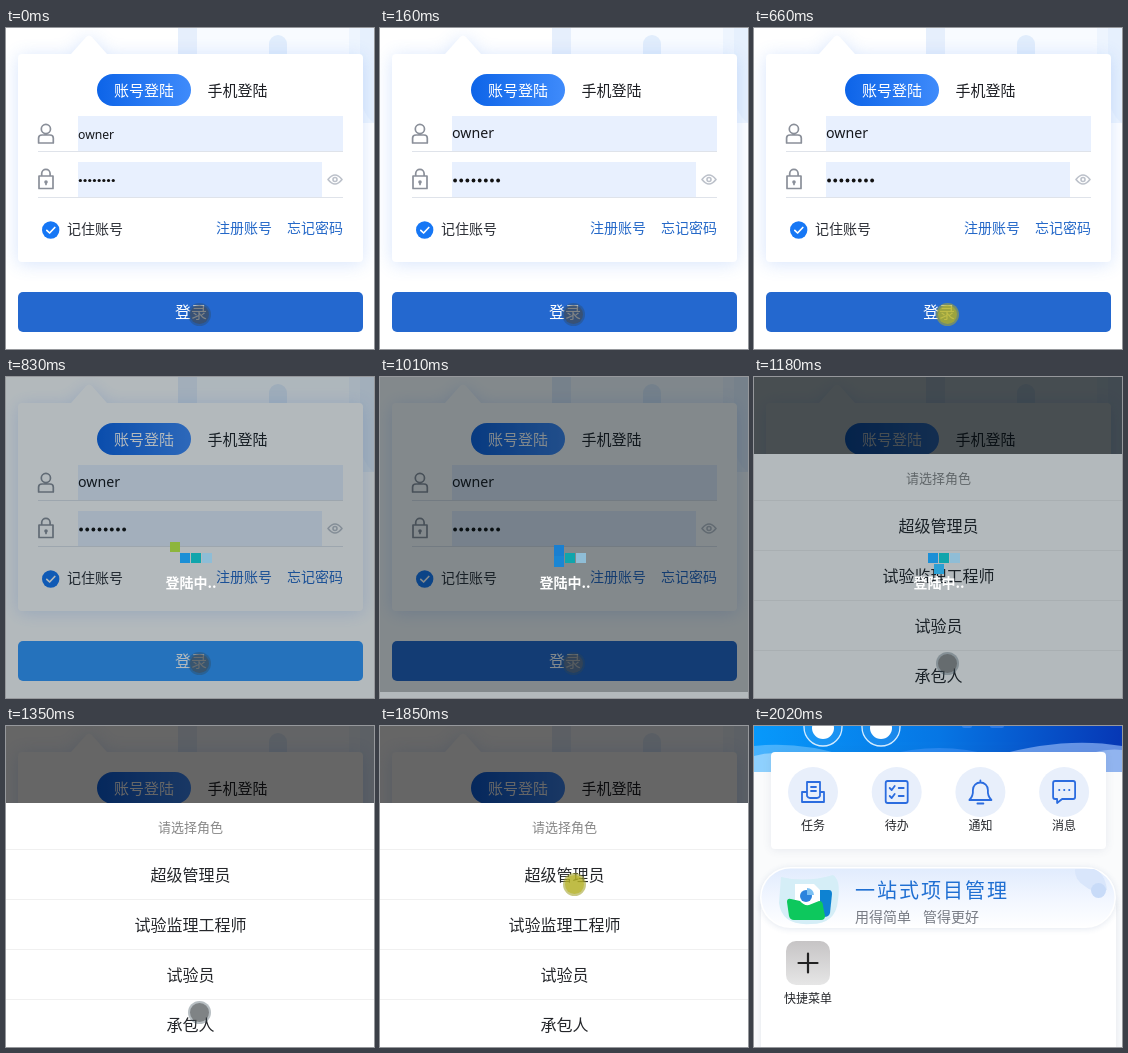
Recreate the animation shown at these times as an HTML page with a canvas. Size 368 by 321 pixels, loop 2.19 s.

```html
<!DOCTYPE html>
<html lang="zh-CN">
<head>
<meta charset="utf-8">
<title>登录</title>
<style>
html, body { margin: 0; width: 100%; height: 100%; overflow: hidden; background: #fff; }
canvas { display: block; }
</style>
</head>
<body>
<canvas id="stage" width="368" height="321"></canvas>
<script>
const W = 368, H = 321, LOOP = 2190;
const ctx = document.getElementById('stage').getContext('2d');
const CJK = '"Noto Sans CJK SC", "Noto Sans CJK", "Noto Sans", sans-serif';
const LATIN = '"Noto Sans", "Open Sans", sans-serif';
const GREY = '#8a8f99', BLUE = '#2b6cdf';

function text(str, x, y, size, color, { align = 'left', weight = 400, font = CJK, spacing = 0 } = {}) {
  ctx.font = `${weight} ${size}px ${font}`;
  ctx.letterSpacing = spacing + 'px';
  ctx.textAlign = align;
  ctx.fillStyle = color;
  ctx.fillText(str, x, y + size * 0.38);
  ctx.letterSpacing = '0px';
}

function rect(x, y, w, h, color) {
  ctx.fillStyle = color;
  ctx.fillRect(x, y, w, h);
}

function round(x, y, w, h, r, color) {
  ctx.beginPath();
  ctx.roundRect(x, y, w, h, r);
  ctx.fillStyle = color;
  ctx.fill();
}

function circle(x, y, r, color) {
  ctx.beginPath();
  ctx.arc(x, y, r, 0, Math.PI * 2);
  ctx.fillStyle = color;
  ctx.fill();
}

function stroke(d, color, width = 1.6, x = 0, y = 0) {
  ctx.save();
  ctx.translate(x, y);
  ctx.strokeStyle = color;
  ctx.lineWidth = width;
  ctx.lineCap = ctx.lineJoin = 'round';
  ctx.stroke(new Path2D(d));
  ctx.restore();
}

function fillPath(d, color) {
  ctx.fillStyle = color;
  ctx.fill(new Path2D(d));
}

function gradient(x0, y0, x1, y1, ...colors) {
  const g = ctx.createLinearGradient(x0, y0, x1, y1);
  colors.forEach((c, i) => g.addColorStop(i / (colors.length - 1), c));
  return g;
}

function withShadow(color, blur, dy, draw) {
  ctx.save();
  ctx.shadowColor = color;
  ctx.shadowBlur = blur;
  ctx.shadowOffsetY = dy;
  draw();
  ctx.restore();
}

function drawLogin({ small, button = '#2468cf' }) {
  rect(0, 0, W, H, '#fff');
  rect(172, 0, 19, 60, '#e6effc');
  rect(191, 0, 177, 26, '#f8fbff');
  round(263, 7, 18, 60, 9, '#e1edfc');
  rect(343, 0, 25, 95, '#eef5fe');
  fillPath('M354 0H368V95Q354 85 354 60Z', '#e6f0fd');

  withShadow('rgba(70,130,240,.22)', 18, 2, () =>
    fillPath('M16 26H65L80 9Q83 6 86 9L101 26H353Q357 26 357 30V230Q357 234 353 234H16Q12 234 12 230V30Q12 26 16 26Z', '#fff'));

  round(91, 46, 94, 32, 16, gradient(91, 0, 185, 0, '#0d64e8', '#3f8bfb'));
  text('账号登陆', 138, 62, 15, '#fff', { align: 'center', weight: 500 });
  text('手机登陆', 201.5, 62, 15, '#1d1f24');

  rect(72, 88, 265, 35, '#e8f0fe');
  rect(72, 134, 244, 35, '#e8f0fe');
  rect(32, 123, 305, 1, '#dfe3ea');
  rect(32, 169, 305, 1, '#dfe3ea');

  stroke('M35.300 101a4.600 4.600 0 1 1 9.200 0a4.600 4.600 0 1 1-9.200 0M36 107H44Q47.300 107 47.300 110V115H32.600V110Q32.600 107 36 107Z', GREY, 1.7);
  stroke('M33 148H47V160.500H33ZM35.700 148V145.500a4.200 4.200 0 0 1 8.400 0V148M40 154V156.500', GREY, 1.7);
  circle(40, 154, 1.8, GREY);
  stroke('M322 151.500Q329 142.500 336 151.500Q329 160.500 322 151.500Z', '#bcc1ca', 1.6);
  stroke('M331 151.500a2 2 0 1 1-4 0a2 2 0 1 1 4 0', '#bcc1ca', 1.6);

  const size = small ? 12.2 : 14.2;
  text('owner', 72, small ? 106 : 105, size, '#16181d', { font: LATIN });
  const pitch = small ? 4.7 : 6.15;
  for (let i = 0; i < 8; i++) circle(72 + pitch * (i + 0.5), 152.5, small ? 1.6 : 1.9, '#111');

  circle(44.7, 202, 8.7, '#1677f5');
  stroke('M40.800 202.300L43.600 205L48.800 199.500', '#fff', 1.7);
  text('记住账号', 61, 201, 14, '#2c2f36');
  text('注册账号', 210, 200, 14, '#2468c8');
  text('忘记密码', 281, 200, 14, '#2468c8');

  round(12, 264, 345, 40, 5, button);
  text('登录', 185, 284, 16, '#fff', { align: 'center' });
}

function drawSheet(top) {
  rect(0, top, W, H - top, '#fff');
  text('请选择角色', 184.5, top + 24, 13, '#888', { align: 'center' });
  ['超级管理员', '试验监理工程师', '试验员', '承包人'].forEach((role, i) => {
    rect(0, top + 46 + i * 50, W, 1, '#f0f0f0');
    text(role, 184.5, top + 72 + i * 50, 16, '#25272b', { align: 'center' });
  });
}

function drawLoader(step) {
  rect(0, 0, W, H, 'rgba(4,24,36,.3)');
  const blue = '#1b8fd6', teal = '#10a5ac', pale = '#8fbdd6';
  rect(185, 176, 10, 10, teal);
  rect(196, 176, 10, 10, pale);
  if (step === 0) {
    rect(164, 165, 10, 10, '#8db53c');
    rect(174, 176, 10, 10, blue);
  } else if (step === 1) {
    rect(174, 168, 10, 11, '#1a7fd0');
    rect(174, 179, 10, 11, '#1a86d4');
  } else {
    rect(174, 176, 10, 10, blue);
    rect(180, 187, 10, 10, '#2b9fd4');
  }
  text('登陆中..', 185, 206, 14, '#fff', { align: 'center', weight: 700 });
}

function drawCursor(x, y, pressed) {
  circle(x, y, 11.5, pressed ? 'rgba(165,165,50,.6)' : 'rgba(50,70,80,.35)');
  circle(x, y, 9.5, pressed ? 'rgba(185,180,30,.6)' : 'rgba(72,72,72,.5)');
}

const menu = [
  ['任务', 'M-6 4V-10H7V4M-2-5H3M-2-1H3M-6 0H-11V10H11V0H7M-6 4Q-5 6-3 6H4Q6 6 7 4'],
  ['待办', 'M-9-11H9Q11-11 11-9V9Q11 11 9 11H-9Q-11 11-11 9V-9Q-11-11-9-11ZM-7-4L-5-2L-2-6M2-4H7M-7 4L-5 6L-2 2M2 4H7'],
  ['通知', 'M-11 8H11Q7 4 7.500-2A7.500 7.500 0 0 0-7.500-2Q-7 4-11 8ZM0-10V-11.500M-3 11.500H3'],
  ['消息', 'M-9-11H9Q11-11 11-9V5Q11 7 9 7H-2L-7 11V7H-9Q-11 7-11 5V-9Q-11-11-9-11ZM-5-2H-4.700M0-2H.3M5-2H5.300']
];

function drawHome() {
  rect(0, 0, W, H, '#fafbfc');
  rect(0, 0, W, 46, gradient(0, 0, W, 40, '#0799fb', '#0676e4', '#0636b4'));
  fillPath('M0 20Q45 15 92 30V46H0Z', 'rgba(150,210,255,.45)');
  fillPath('M0 30Q20 24 45 30V46H0Z', 'rgba(190,228,255,.6)');
  fillPath('M130 30Q185 14 240 30Z', 'rgba(90,160,255,.4)');
  fillPath('M240 30Q310 10 368 20V46H300Z', 'rgba(140,180,245,.7)');
  fillPath('M330 30Q350 22 368 24V46H330Z', 'rgba(175,205,248,.6)');
  round(208, -6, 10, 8, 2, 'rgba(120,170,255,.35)');
  round(236, -6, 14, 8, 2, 'rgba(120,170,255,.35)');

  for (const x of [69, 127]) {
    circle(x, 1, 19.5, 'rgba(255,255,255,.08)');
    stroke('M19 0A19 19 0 1 1-19 0A19 19 0 1 1 19 0', '#d5ecff', 1.3, x, 1);
    circle(x, 2, 11, '#fff');
  }

  withShadow('rgba(60,80,120,.1)', 10, 1, () => round(17, 26, 335, 97, 4, '#fff'));
  menu.forEach(([label, icon], i) => {
    const x = 59 + i * 83.7;
    circle(x, 66, 25, '#e8effb');
    stroke(icon, BLUE, 1.8, x, 66);
    text(label, x, 99, 12, '#25272b', { align: 'center' });
  });

  withShadow('rgba(60,80,120,.12)', 8, 1, () => round(7, 172, 355, 170, 8, '#fff'));
  withShadow('rgba(60,90,150,.14)', 6, 1, () => round(6, 141, 356, 61, 30.5, '#fff'));
  round(7.5, 142.5, 353, 58, 29, gradient(0, 141, 0, 202, '#e0ebfd', '#f1f6ff', '#fff'));
  fillPath('M321 143H340Q351 147 353 164Q341 168 332 161Q320 154 321 143Z', '#d9e6fb');
  circle(344.5, 164.5, 7.5, '#c8dbf8');

  fillPath('M27 151Q52 157 79 149Q87 154 84 174Q82 198 57 198Q28 200 25 177Z', '#d5eef7');
  fillPath('M63 164H75Q78 164 78 168L76 187Q75 191 70 191H60Z', '#0e82d2');
  fillPath('M41 158H60L66 164V184H41Z', '#fff');
  circle(52, 170, 6, '#2c83dd');
  fillPath('M53 169V162A7 7 0 0 1 60 169Z', '#7cc0f3');
  fillPath('M33 176Q33 172 37 173L46 175Q50 180 55 179L65 175Q69 175 69 180L71 190Q71 194 67 194H40Q36 194 35 190Z', '#0dc85d');

  text('一站式项目管理', 101, 164, 20, '#1f6fd2', { spacing: 2, weight: 500 });
  text('用得简单', 101, 191, 14, '#777b84');
  text('管得更好', 169, 191, 14, '#777b84');

  round(32, 215, 44, 44, 10, gradient(0, 215, 0, 259, '#c6c4c5', '#e6e6e6'));
  stroke('M44.500 237H63.500M54 227.500V246.500', '#222', 2.2);
  text('快捷菜单', 54, 272, 12, '#25272b', { align: 'center' });
}

const rest = [193.5, 286.5];
const scenes = [
  { at: 0, small: true, cursor: rest },
  { at: 160, cursor: rest },
  { at: 660, cursor: rest, pressed: true },
  { at: 830, cursor: rest, button: '#3399ff', loader: 0 },
  { at: 1010, cursor: rest, dim: 0.27, sheet: 315, loader: 1 },
  { at: 1180, cursor: rest, dim: 0.6, sheet: 77, loader: 2 },
  { at: 1350, cursor: rest, dim: 0.6, sheet: 77 },
  { at: 1510, cursor: [202.5, 225.5], dim: 0.6, sheet: 77 },
  { at: 1680, cursor: [196.5, 163.5], dim: 0.6, sheet: 77 },
  { at: 1850, cursor: [194.5, 158.5], dim: 0.6, sheet: 77, pressed: true },
  { at: 2020, home: true }
];

function render(time) {
  const scene = scenes.findLast(s => s.at <= time);
  if (scene.home) return drawHome();
  drawLogin(scene);
  if (scene.dim) rect(0, 0, W, H, `rgba(0,0,0,${scene.dim})`);
  if (scene.sheet) drawSheet(scene.sheet);
  if (scene.loader !== undefined) drawLoader(scene.loader);
  drawCursor(...scene.cursor, scene.pressed);
}

const start = performance.now();
function tick() {
  render((performance.now() - start) % LOOP);
  requestAnimationFrame(tick);
}
tick();
</script>
</body>
</html>
```
